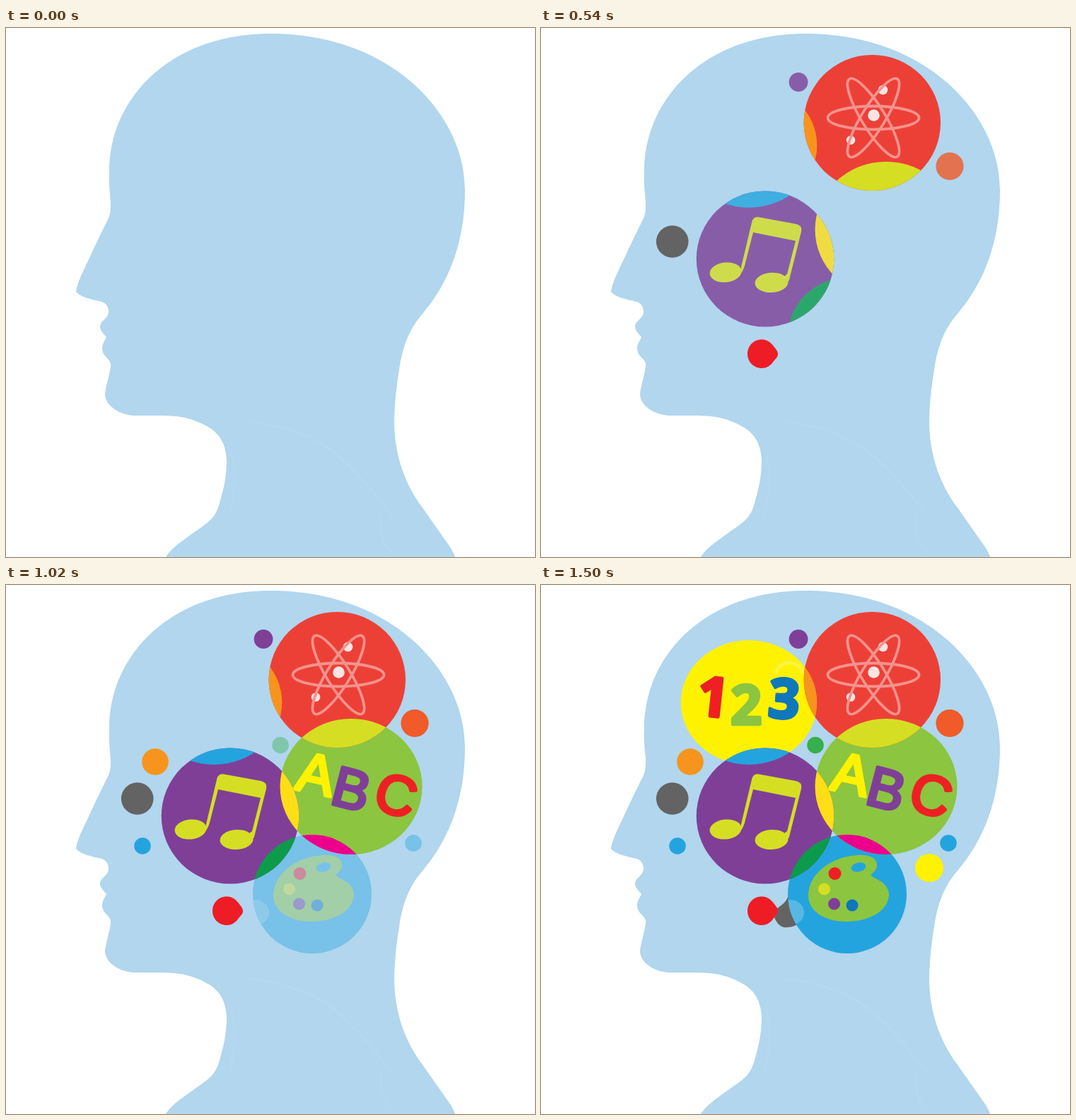
An HTML page without scripts that plays this animation: 748 px wide and 748 px high, repeating every 2700 ms.

```html
<!DOCTYPE html>
<html lang="en">
<head>
<meta charset="utf-8">
<title>Learning mind</title>
<style>
  @property --t { syntax: "<number>"; inherits: true; initial-value: 0; }

  html, body { margin: 0; width: 100%; height: 100%; overflow: hidden; background: #fff; }

  /* --t counts the stages shown so far; each stage fades in over ten steps */
  svg { display: block; width: 100%; height: 100%; animation: reveal 2.7s infinite; }
  @keyframes reveal {
    0% { --t: 0; animation-timing-function: steps(50); }
    55.5555%, 100% { --t: 5; }
  }
  .stage { opacity: calc(var(--t) - var(--i)); }

  text { text-anchor: middle; stroke-width: 4.5; stroke-linejoin: round; }
  .abc { font: 79px "Liberation Sans", Arial, sans-serif; }
  .num { font: 700 77px "Open Sans", sans-serif; }

  .red { fill: #ee2024; stroke: #ee2024; }
  .yellow { fill: #fff200; stroke: #fff200; }
  .green { fill: #8cc540; stroke: #8cc540; }
  .purple { fill: #7f3f97; stroke: #7f3f97; }
  .navy { fill: #0f77bb; stroke: #0f77bb; }
  .blue { fill: #24a4de; }
  .grey { fill: #636363; }
  .orange { fill: #f7941d; }
  .lime { fill: #d6de23; }
  .shape { stroke: none; }
</style>
</head>
<body>
<svg viewBox="0 0 748 748" xmlns="http://www.w3.org/2000/svg">
  <defs>
    <ellipse id="science" cx="468.3" cy="134" rx="96.7" ry="96"/>
    <ellipse id="music" cx="317" cy="326.5" rx="97.3" ry="96"/>
    <ellipse id="letters" cx="488" cy="285" rx="100.5" ry="96"/>
    <circle id="art" cx="433" cy="437" r="84"/>
    <ellipse id="maths" cx="294" cy="166" rx="96.3" ry="88"/>
    <clipPath id="inScience"><use href="#science"/></clipPath>
    <clipPath id="inMusic"><use href="#music"/></clipPath>
    <clipPath id="inLetters"><use href="#letters"/></clipPath>
    <clipPath id="inArt"><use href="#art"/></clipPath>
    <ellipse id="orbit" rx="64.5" ry="16.5"/>
  </defs>

  <path fill="#b1d6ee" d="M226 748C236 731 264 716 284 700C296 691 300 680 303 668
    C308 652 312 632 312 611C311 588 302 572 282 562C262 551 243 548 216 548H186
    C166 549 140 537 140 517C141 508 146 492 148 479C150 467 136 466 136 453
    C136 446 140 442 142 437C138 432 133 428 133 422C134 413 145 411 145 401
    C145 395 142 389 135 387C122 384 106 381 99 373C101 357 114 335 124 312
    C131 297 138 283 145 269C148 262 148 255 148 247C147 232 145 221 146 203
    C146 98 234 8 374 8C545 8 649 122 649 229C649 300 628 358 589 404
    C568 428 560 455 556 483C551 512 549 540 549 561C550 604 564 645 588 677
    L628 734Q633 742 635 748Z"/>
  <path fill="none" stroke="#b6daf0" stroke-width="1.5" d="M338 556Q410 564 450 590T546 690M530 690Q528 728 546 741
    M319 600Q327 645 316 690"/>

  <!-- Later stages lie underneath, so earlier overlaps stay visible -->
  <g class="stage" style="--i:4">
    <use href="#maths" class="yellow shape"/>
    <path d="M333 125A18 15 0 0 1 369 125" fill="none" stroke="#fcf443" stroke-width="5"/>
    <g class="num">
      <text class="red" transform="translate(240.5 185.5) rotate(6)">1</text>
      <text class="green" transform="translate(290 197)">2</text>
      <text class="navy" transform="translate(342 188) rotate(4)">3</text>
    </g>
    <path class="grey" d="M350 437C349 447 340 453 333 458L335 461Q334 466 330 470
      C334 480 340 485 348 484C356 484 360 481 364 479L362 440Z"/>
    <circle class="yellow shape" cx="549" cy="400" r="20"/>
  </g>

  <g class="stage" style="--i:3">
    <use href="#art" class="blue"/>
    <ellipse cx="352" cy="463" rx="20" ry="18" fill="#58b8e4" clip-path="url(#inArt)"/>
    <path class="green shape" d="M378 438C379 408 410 384 448 382C470 380 480 392 473 403
      C469 408 466 409 467 411C470 415 492 420 492 438C491 462 462 476 432 476C400 476 377 460 378 438Z"/>
    <ellipse class="blue" rx="10.5" ry="6.5" transform="translate(449 399) rotate(-12)"/>
    <circle class="red shape" cx="415.5" cy="408" r="9"/>
    <circle class="lime" cx="400.5" cy="430" r="8.5"/>
    <circle class="purple shape" cx="414.5" cy="451" r="8.5"/>
    <circle class="navy shape" cx="440" cy="453" r="8.5"/>
    <circle cx="388" cy="226.5" r="11.8" fill="#36b04b"/>
    <circle class="blue" cx="576" cy="365" r="11.8"/>
  </g>

  <g class="stage" style="--i:2">
    <use href="#letters" class="green shape"/>
    <use href="#art" fill="#ec008c" clip-path="url(#inLetters)"/>
    <g class="abc">
      <text class="yellow" transform="translate(433 294) rotate(12)">A</text>
      <text class="purple" transform="translate(481.5 315) rotate(14.5)">B</text>
      <text class="red" transform="translate(543.6 323) rotate(17)">C</text>
    </g>
    <circle class="orange" cx="211" cy="250" r="18.8"/>
    <circle class="blue" cx="193" cy="369" r="11.8"/>
  </g>

  <g class="stage" style="--i:1">
    <use href="#music" class="purple shape"/>
    <g clip-path="url(#inMusic)">
      <use href="#maths" class="blue"/>
      <use href="#letters" fill="#ffde17"/>
      <use href="#art" fill="#0c9b4a"/>
    </g>
    <g class="lime">
      <ellipse rx="22.5" ry="14" transform="translate(261 345.5) rotate(-6)"/>
      <ellipse rx="23.5" ry="14" transform="translate(326 360) rotate(-3)"/>
      <path d="M283 338L298 275Q300 266 308 267.5L360 277Q370 279 368 288L351 356
        Q348 364 343 352L348 348L360 301L300 289L288 336Q285 346 280 350Z"/>
    </g>
    <circle class="purple shape" cx="364" cy="76.5" r="13.4"/>
    <circle cx="578" cy="195.5" r="19.6" fill="#f15a29"/>
  </g>

  <g class="stage" style="--i:0">
    <use href="#science" fill="#ec4037"/>
    <g clip-path="url(#inScience)">
      <use href="#maths" class="orange"/>
      <use href="#letters" class="lime"/>
    </g>
    <g fill="#fbe5e3">
      <circle cx="483.5" cy="87.5" r="6.8"/>
      <circle cx="438" cy="158.5" r="6.3"/>
      <circle cx="470.5" cy="123.5" r="8.3"/>
    </g>
    <g transform="translate(470 127)" fill="none" stroke="#f3938d" stroke-width="3.8">
      <use href="#orbit"/>
      <use href="#orbit" transform="rotate(58.5)"/>
      <use href="#orbit" transform="rotate(-58.5)"/>
    </g>
    <circle class="grey" cx="185.7" cy="302" r="22.8"/>
    <path fill="#ee1c25" d="M312 440.5C320 440 326 446 329 450C332 454 335 457 335 461C335 466 331 468 329 471
      C326 476 320 481 312 481C301 481 292 472 292 461C292 449 301 440.5 312 440.5Z"/>
  </g>
</svg>
</body>
</html>
```
